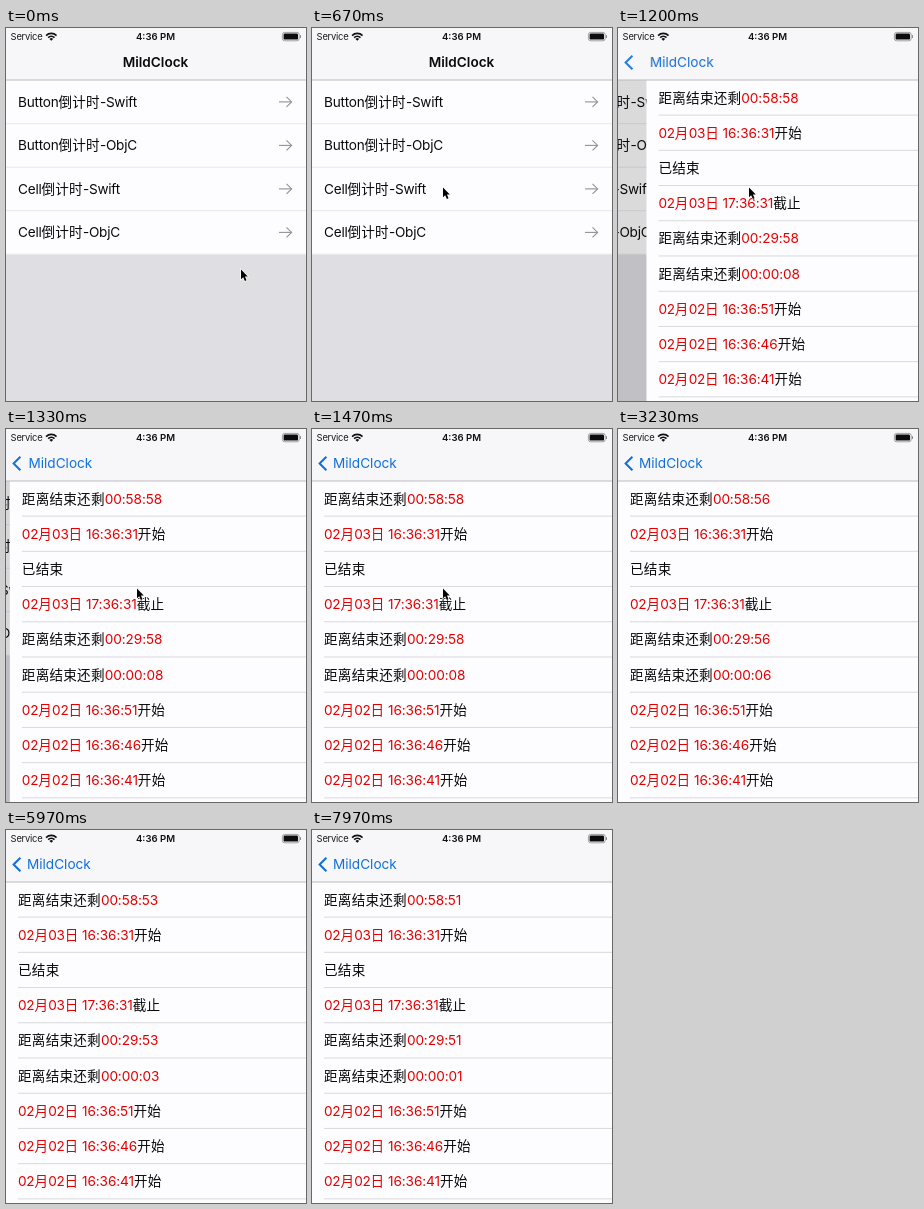
Write an HTML page with a canvas that moves like this. It is 300x373 px and loops after 8000 ms.

```html
<!DOCTYPE html>
<html lang="zh-CN">
<head>
<meta charset="utf-8">
<title>Countdown list</title>
<style>
html, body { margin: 0; width: 100%; height: 100%; overflow: hidden; background: #dfdee3; }
canvas { display: block; width: 300px; height: 373px; }
</style>
</head>
<body>
<canvas id="stage"></canvas>
<script>
const W = 300, H = 373, LOOP = 8000, NAV = 52;
const FONT = "Inter, 'Noto Sans CJK SC', 'Noto Sans CJK', sans-serif";
const RED = '#e30000', BLACK = '#0a0a0b', BLUE = '#0f70dc', PAPER = '#fdfcfe';
const TITLE = 'MildClock';
const MENU = ['Button倒计时-Swift', 'Button倒计时-ObjC', 'Cell倒计时-Swift', 'Cell倒计时-ObjC'];

const canvas = document.getElementById('stage');
const ctx = canvas.getContext('2d');
const dpr = window.devicePixelRatio || 1;
canvas.width = W * dpr;
canvas.height = H * dpr;

const clamp = v => Math.min(1, Math.max(0, v));
const mix = (a, b, p) => a + (b - a) * p;
const smooth = p => p * p * (3 - 2 * p);
const two = n => String(n).padStart(2, '0');

function rect(x, y, w, h, color) {
  ctx.fillStyle = color;
  ctx.fillRect(x, y, w, h);
}

function stroke(points, color, width) {
  ctx.beginPath();
  points.forEach(([x, y]) => ctx.lineTo(x, y));
  ctx.strokeStyle = color;
  ctx.lineWidth = width;
  ctx.stroke();
}

// Tracking differs between Chinese, clock digits and Latin text.
function tracking(run) {
  if (/[\u4e00-\u9fff]/.test(run)) return '0.22px';
  return run.includes(':') ? '-0.08px' : '-0.24px';
}

// Draws mixed text and returns the x where it ends.
function text(str, x, y, color = BLACK, size = 13.6) {
  ctx.font = `400 ${size}px ${FONT}`;
  ctx.fillStyle = color;
  ctx.textAlign = 'left';
  for (const run of str.match(/[\u4e00-\u9fff]+|[^\u4e00-\u9fff]+/g)) {
    ctx.letterSpacing = tracking(run);
    ctx.fillText(run, x, y);
    x += ctx.measureText(run).width;
  }
  ctx.letterSpacing = '0px';
  return x;
}

function centered(str, x, y, color, size, weight) {
  ctx.font = `${weight} ${size}px ${FONT}`;
  ctx.fillStyle = color;
  ctx.textAlign = 'center';
  ctx.fillText(str, x, y);
}

function menuScreen(x) {
  ctx.save();
  ctx.translate(x, 0);
  rect(0, NAV, W, H, '#dfdee3');
  rect(0, NAV, W, 174.3, PAPER);
  MENU.forEach((label, i) => {
    const y = 73.9 + i * 43.5;
    text(label, 12, y + 4.8);
    stroke([[273, y], [285.5, y]], '#929294', 1.1);
    stroke([[280.5, y - 5], [285.6, y], [280.5, y + 5]], '#929294', 1.1);
    rect(0, y + 21.3, W, 1, '#e9e8ec');
  });
  ctx.restore();
}

const left = clock => [['距离结束还剩', BLACK], [clock, RED]];
const date = (day, clock, end) => [[day + ' ', RED], [clock, RED], [end, BLACK]];

function timerRows(tick) {
  return [
    left('00:58:' + two(58 - tick)),
    date('02月03日', '16:36:31', '开始'),
    [['已结束', BLACK]],
    date('02月03日', '17:36:31', '截止'),
    left('00:29:' + two(58 - tick)),
    left('00:00:' + two(8 - tick)),
    ...[51, 46, 41].map(s => date('02月02日', '16:36:' + s, '开始'))
  ];
}

function timerScreen(x, tick) {
  ctx.save();
  ctx.translate(x, 0);
  rect(0, NAV, W, H, PAPER);
  timerRows(tick).forEach((row, i) => {
    const y = 69.7 + i * 35.22;
    let tx = 12;
    for (const [str, color] of row) tx = text(str, tx, y + 4.8, color);
    rect(12, y + 16.9, W, 1, '#dad9dd');
  });
  ctx.restore();
}

function statusBar() {
  text('Service', 4.6, 12.4, '#1b1b1c', 9.4);
  centered('4:36 PM', 149.5, 12.4, '#111', 9.6, 600);

  ctx.strokeStyle = ctx.fillStyle = '#111';
  ctx.lineWidth = 1.6;
  for (const r of [4.5, 7.4]) {
    ctx.beginPath();
    ctx.arc(45.3, 12.8, r, -Math.PI * 0.75, -Math.PI * 0.25);
    ctx.stroke();
  }
  ctx.beginPath();
  ctx.moveTo(45.3, 12.8);
  ctx.arc(45.3, 12.8, 2.6, -Math.PI * 0.75, -Math.PI * 0.25);
  ctx.fill();

  ctx.strokeStyle = '#8b8b8d';
  ctx.lineWidth = 0.8;
  ctx.beginPath();
  ctx.roundRect(276.4, 4.4, 16.8, 8.4, 2.2);
  ctx.stroke();
  ctx.fillStyle = '#0c0c0c';
  ctx.beginPath();
  ctx.roundRect(277.6, 5.6, 14.4, 6, 1.2);
  ctx.fill();
  rect(294, 7.2, 1, 2.8, '#8b8b8d');
}

function navBar(p) {
  rect(0, 0, W, NAV, '#f7f6f8');
  rect(0, NAV - 0.5, W, 1, '#bdbcc0');
  statusBar();

  ctx.font = `400 13.6px ${FONT}`;
  const backX = 21 + ctx.measureText(TITLE).width / 2;
  const x = mix(149.5, backX, Math.pow(p, 1.2));
  ctx.globalAlpha = 1 - p;
  centered(TITLE, x, 39.2, BLACK, 13.6, 600);
  ctx.globalAlpha = p;
  centered(TITLE, x, 39.2, BLUE, 13.6, 400);
  stroke([[14.4, 27.8], [7.6, 34.5], [14.4, 41.2]], BLUE, 2);
  ctx.globalAlpha = 1;
}

function pointer(t) {
  if (t >= 2950) return;
  const move = smooth(clamp((t - 50) / 620));
  const exit = Math.pow(clamp((t - 2740) / 200), 2);
  ctx.save();
  ctx.translate(mix(235, 131, move) + 116 * exit, mix(241.5, 159.5, move) - 8 * exit);
  ctx.scale(0.92, 0.92);
  ctx.beginPath();
  [[0, 0], [0, 10.6], [2.4, 8.4], [4.2, 12.5], [6, 11.7], [4.3, 7.7], [7.4, 7.5]]
    .forEach(([x, y]) => ctx.lineTo(x, y));
  ctx.closePath();
  ctx.strokeStyle = '#fff';
  ctx.lineWidth = 1.4;
  ctx.stroke();
  ctx.fillStyle = '#000';
  ctx.fill();
  ctx.restore();
}

// Critically damped spring for the screen push, settled once within half a pixel.
function pushProgress(t) {
  const k = Math.max(0, t - 986) * 0.0184;
  const rest = (1 + k) * Math.exp(-k);
  return rest * W < 0.5 ? 1 : 1 - rest;
}

function draw(t) {
  const p = pushProgress(t);
  const tick = Math.max(0, Math.floor((t - 965) / 1000));
  ctx.setTransform(dpr, 0, 0, dpr, 0, 0);
  ctx.textBaseline = 'alphabetic';
  if (p < 1) {
    menuScreen(-0.3 * W * p);
    rect(0, NAV, W, H, `rgba(0,0,0,${0.15 * p})`);
  }
  if (p > 0) timerScreen(W * (1 - p), tick);
  navBar(p);
  pointer(t);
}

const start = performance.now();
function frame() {
  draw((performance.now() - start) % LOOP);
  requestAnimationFrame(frame);
}
frame();
</script>
</body>
</html>
```
